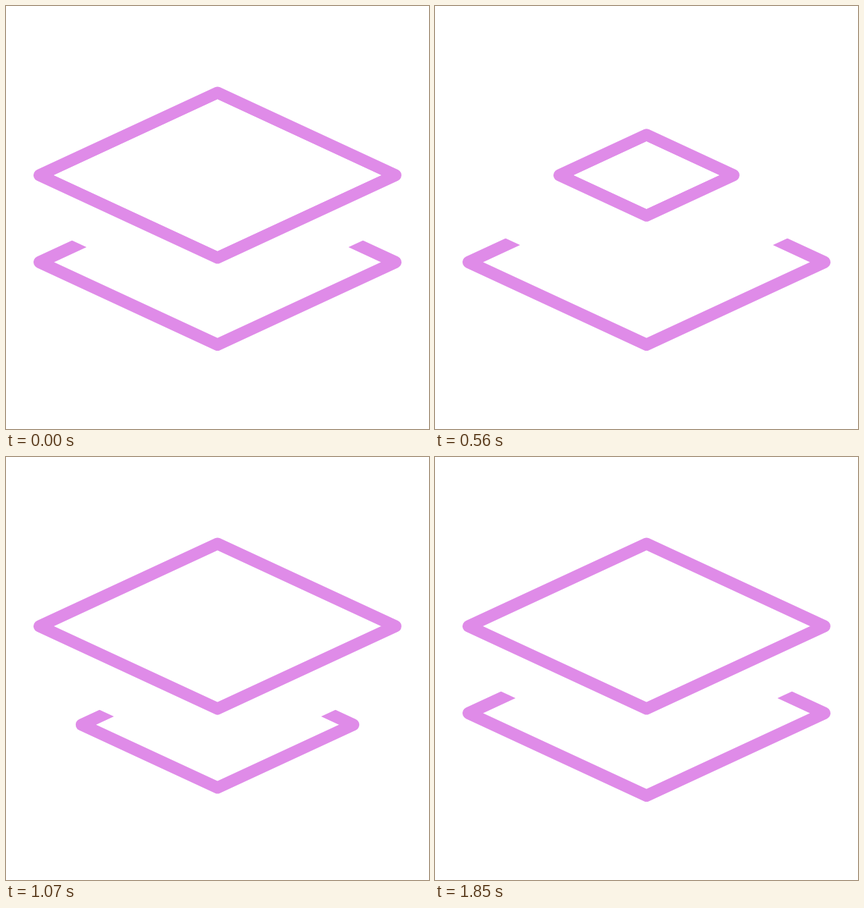
Animation of 600x600 px, one loop 1.88 s. Source, as an HTML page with a canvas:

```html
<!DOCTYPE html>
<html lang="en">
<head>
<meta charset="utf-8">
<title>Layers</title>
<style>
  html, body { margin: 0; width: 100%; height: 100%; overflow: hidden; background: #fff; }
  canvas { display: block; width: 600px; height: 600px; }
</style>
</head>
<body>
<canvas id="stage" width="600" height="600"></canvas>
<script>
const ctx = document.getElementById('stage').getContext('2d');
const LOOP = 1880, STEP = 30, HOLD = 50;
const PINK = [223, 139, 232];
const SLOPE = 0.4634, LINE = 17.2;
const FULL = 252.4, SMALL = 123.4;
const TOP = 240, MID = 301.7, LOW = 363.4;

const mix = (a, b, k) => a + (b - a) * k;
const span = (n, from, to) => Math.min(1, Math.max(0, (n - from) / (to - from)));
const smooth = x => x * x * (3 - 2 * x);
const ink = k => `rgb(${PINK.map(c => Math.round(mix(255, c, k)))})`;

// Cubic bezier (.286, 0, .344, 1), solved by bisection
function ease(x) {
  let lo = 0, hi = 1;
  for (let i = 0; i < 24; i++) {
    const s = (lo + hi) / 2, r = 1 - s;
    const at = 3 * s * r * r * 0.286 + 3 * s * s * r * 0.344 + s * s * s;
    if (at < x) lo = s; else hi = s;
  }
  return smooth((lo + hi) / 2);
}

function trace(y, half) {
  const h = half * SLOPE;
  ctx.beginPath();
  ctx.moveTo(300 - half, y);
  ctx.lineTo(300, y - h);
  ctx.lineTo(300 + half, y);
  ctx.lineTo(300, y + h);
  ctx.closePath();
}

function outline(y, half, color, alpha = 1) {
  trace(y, half);
  ctx.globalAlpha = alpha;
  ctx.strokeStyle = color;
  ctx.stroke();
  ctx.globalAlpha = 1;
}

function fill(y, half) {
  trace(y, half);
  ctx.fillStyle = '#fff';
  ctx.fill();
}

function sheet(y, half, color) {
  fill(y, half);
  outline(y, half, color);
}

function draw(n) {
  ctx.fillStyle = '#fff';
  ctx.fillRect(0, 0, 600, 600);
  ctx.lineWidth = LINE;
  ctx.lineJoin = 'round';

  // Sheet entering from below
  if (n >= 19) {
    const left = Math.max(0, 0.1005 * (54 - n)) ** 4;
    const half = mix(SMALL, FULL, ease(span(n, 18, 60)));
    sheet(LOW + Math.min(left, 138), half, ink(1));
  }

  // Lower sheet fades to white while it becomes the middle one
  const lowY = mix(LOW, MID, smooth(span(n, 17, 39)));
  sheet(lowY, FULL, ink(1 - smooth(span(n, 21, 30))));

  const midY = mix(MID, TOP, ease(span(n, 14, 34.5)));
  sheet(midY, FULL, '#fff');

  // Top sheet shrinks, then leaves upwards
  const topY = TOP - 134 * ease(span(n, 18.3, 30.6));
  const topHalf = mix(FULL, SMALL, ease(span(n, 0, 16.5)));
  const fade = 1 - span(n, 26, 32);
  if (fade > 0) {
    fill(topY, topHalf);
    outline(topY, topHalf, ink(1), fade);
  }

  // Middle sheet takes on colour and opacity together
  const show = smooth(span(n, 18.4, 29.2));
  outline(midY, FULL, ink(show), show);
  if (n < 24) fill(topY, topHalf - 20.4);
}

function frame(now) {
  const t = now % LOOP;
  draw(Math.max(0, Math.floor((t - HOLD) / STEP)));
  requestAnimationFrame(frame);
}

draw(0);
const start = performance.now();
requestAnimationFrame(now => frame(Math.max(0, now - start)));
</script>
</body>
</html>
```
